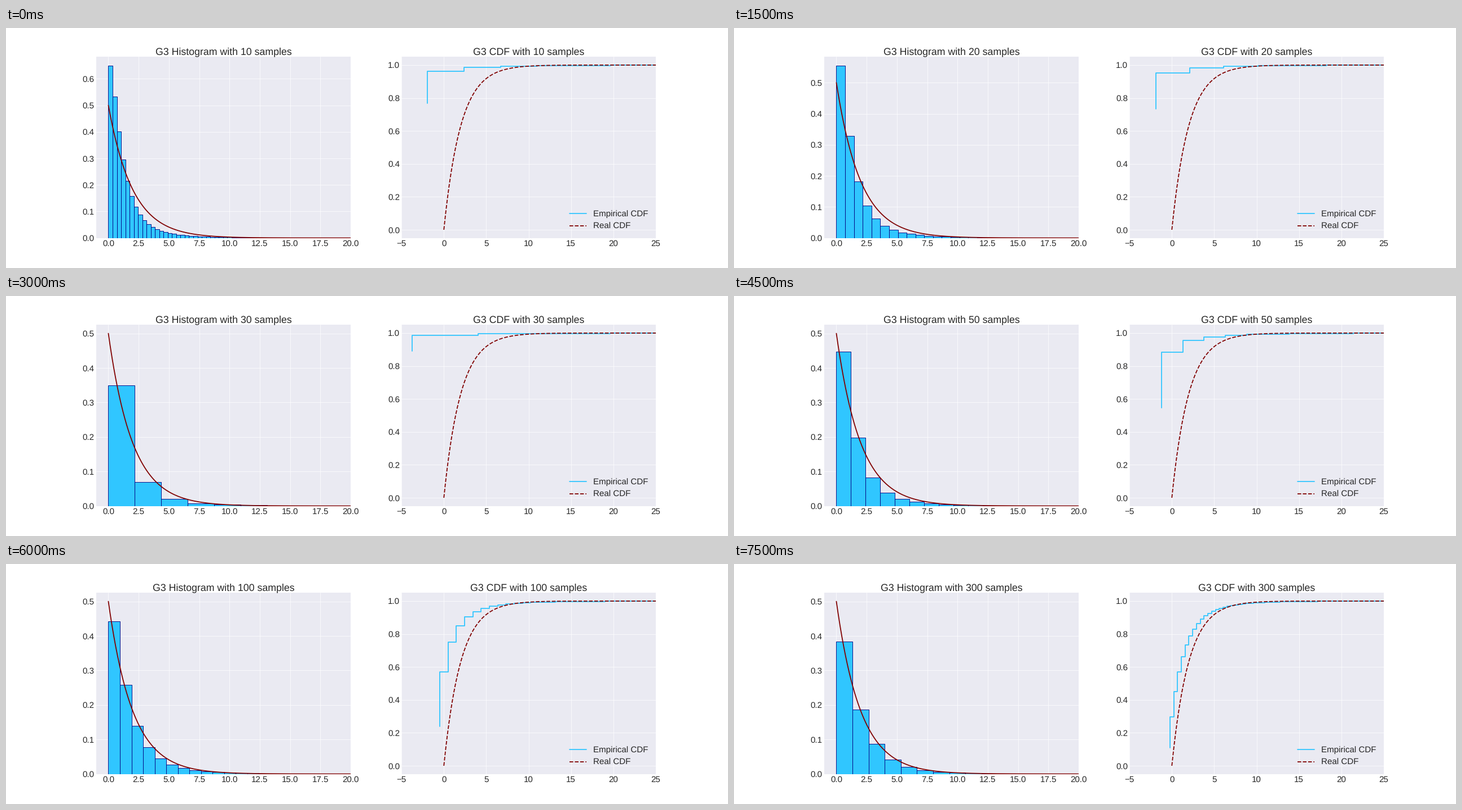
These frames come from a looping animation (1280x427 px, 8 s). A matplotlib script:

```python
import numpy as np
import matplotlib.pyplot as plt
from matplotlib.animation import FuncAnimation
from matplotlib.ticker import MultipleLocator, FormatStrFormatter

W, H, DPI = 1280, 427, 64
SKY, NAVY, MAROON = "#30C6FF", "#000080", "#800000"
STEP_MS, LOOP_MS, HOLD_MS = 500, 8000, 1500
BINS = 100

plt.rcParams.update({
    "font.family": "Liberation Sans",
    "text.hinting": "none",
    "text.color": "0.15",
    "xtick.color": "0.15",
    "ytick.color": "0.15",
    "axes.facecolor": "#EAEAF2",
    "axes.edgecolor": "white",
    "axes.linewidth": 0,
    "axes.axisbelow": True,
    "axes.grid": True,
    "grid.color": "white",
    "grid.linewidth": 0.8,
    "xtick.major.size": 0,
    "ytick.major.size": 0,
    "lines.solid_capstyle": "round",
})

# samples, largest value, and (p, q, k) of the tail (1 + p x + q x^2)^-k
STAGES = [
    (10, 35.05, (0.57, 0.333, 1.2)),
    (20, 72.54, (0.55, 0.262, 1.2)),
    (30, 218.4, (0.57, 0.223, 1.2)),
    (50, 120.75, (0.463, 0.241, 1.2)),
    (100, 95.55, (0.335, 0.098, 1.6)),
    (300, 133.2, (0.255, 0.0515, 2.0)),
]


def empirical(x, shape):
    """Cumulative share of simulated values up to x."""
    p, q, k = shape
    return 1 - (1 + p * x + q * x * x) ** -k


def real(x):
    return 1 - np.exp(-x / 2)


fig, (hist_ax, cdf_ax) = plt.subplots(1, 2, figsize=(W / DPI, H / DPI), dpi=DPI)
fig.subplots_adjust(left=0.125, right=0.9, bottom=0.125, top=0.88, wspace=0.2)
curve_x = np.linspace(0, 25, 500)


def set_axes(ax, title, xlim, ylim, xstep, ystep):
    ax.set_title(title, fontsize=20, pad=5)
    ax.set_xlim(*xlim)
    ax.set_ylim(*ylim)
    ax.xaxis.set_major_locator(MultipleLocator(xstep))
    ax.yaxis.set_major_locator(MultipleLocator(ystep))
    ax.yaxis.set_major_formatter(FormatStrFormatter("%.1f"))
    ax.tick_params(labelsize=17, pad=3.5)


def draw_histogram(samples, largest, shape):
    ax = hist_ax
    ax.clear()
    edges = np.linspace(0, largest, BINS + 1)
    width = edges[1]
    heights = np.diff(empirical(edges, shape)) / width
    ax.bar(edges[:-1], heights, width, align="edge",
           color=SKY, edgecolor=NAVY, linewidth=1)
    ax.plot(curve_x, (1 - real(curve_x)) / 2, color=MAROON, lw=2)
    top = 1.05 * max(0.5, heights[0])
    set_axes(ax, f"G3 Histogram with {samples} samples",
             (-1, 20), (0, top), 2.5, 0.1)
    ax.xaxis.set_major_formatter(FormatStrFormatter("%.1f"))


def draw_cdf(samples, largest, shape):
    ax = cdf_ax
    ax.clear()
    # one bin per sample, the first one centred on zero
    width = largest / (samples - 1)
    levels = empirical((np.arange(samples) + 0.5) * width, shape)
    x = np.linspace(-width / 2, largest + width / 2, samples)
    ax.plot(x, levels, color=SKY, lw=2, drawstyle="steps-pre",
            label="Empirical CDF")
    ax.plot(curve_x, real(curve_x), "--", color=MAROON, lw=2, label="Real CDF")
    set_axes(ax, f"G3 CDF with {samples} samples",
             (-5, 25), (-0.05, 1.05), 5, 0.2)
    ax.legend(loc="lower right", fontsize=17, frameon=False)


def update(i):
    stage = STAGES[i * STEP_MS // HOLD_MS]
    draw_histogram(*stage)
    draw_cdf(*stage)
    return []


anim = FuncAnimation(fig, update, frames=LOOP_MS // STEP_MS, interval=STEP_MS,
                     init_func=lambda: [], repeat=True, repeat_delay=0)
plt.show()
```
